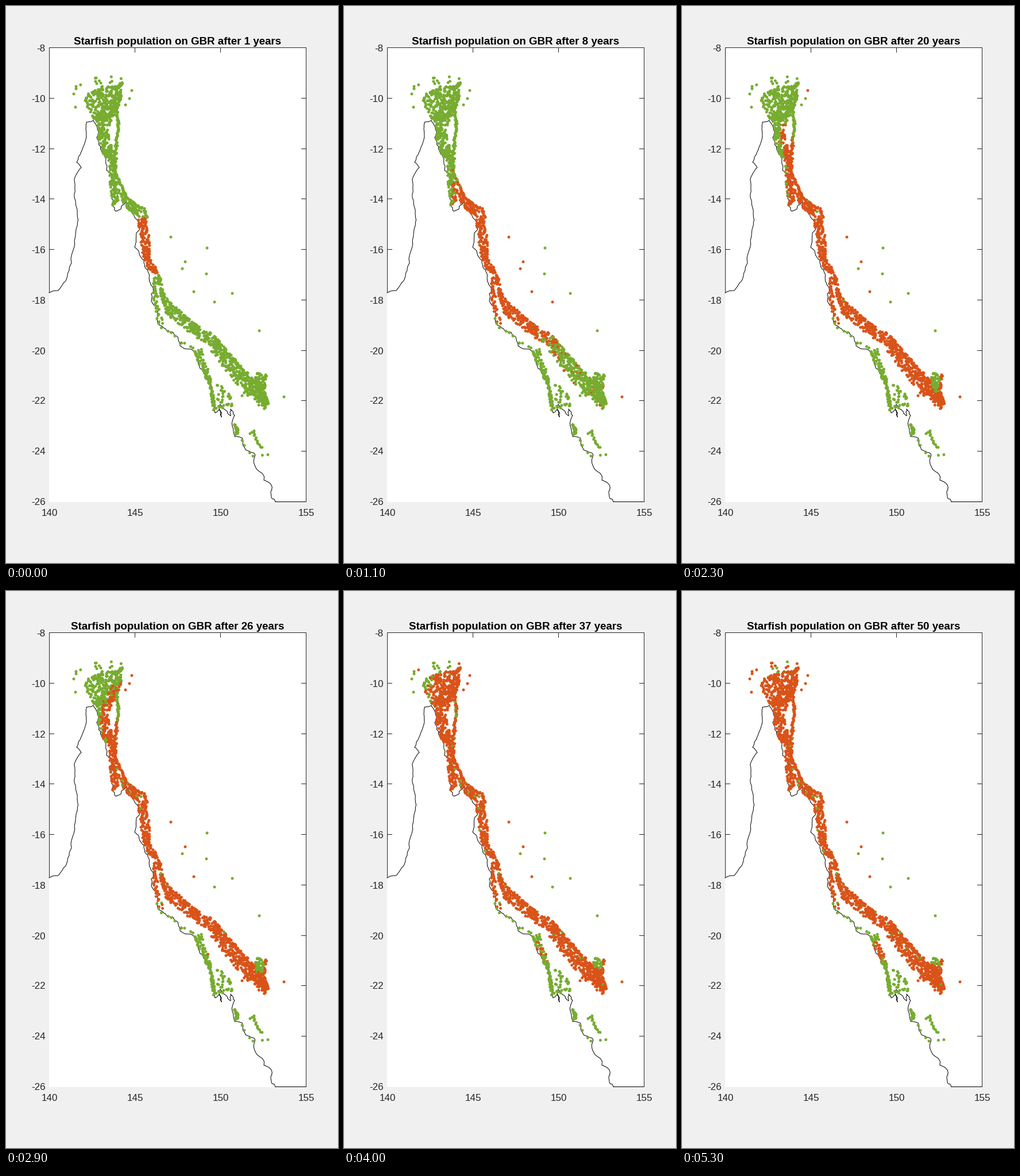
Animation, 578 px wide and 969 px high, one loop 5.4 s. Source, as a matplotlib script:

```python
import numpy as np
import matplotlib.pyplot as plt
from matplotlib.animation import FuncAnimation
from matplotlib.colors import to_rgba
from matplotlib.patches import Polygon, Rectangle

W, H, DPI = 578, 969, 64
PX = 72 / DPI
LEFT, RIGHT, TOP, BOTTOM = 75.5, 522.5, 72.5, 862.5
INK = "#262626"
GREEN, ORANGE = to_rgba("#77AC30"), to_rgba("#D95319")
FRAMES, STEP = 54, 100
NEVER = 999

rng = np.random.default_rng(12)
reefs = []


# --- outbreak rules: year a reef turns orange; s runs from shore 0 to sea 1 ---

def start(x, y, s):
    return np.ones(len(x))


def never(x, y, s):
    return np.full(len(x), NEVER)


def north(x, y, s, lag=0):
    front = np.interp(y, [130, 165, 250, 300, 368], [31, 26, 15, 8.5, 2])
    delay = lag * (1 - s) ** 2 * rng.uniform(0.5, 1.6, len(x))
    return np.maximum(front + delay + rng.normal(0, 1.2, len(x)), 2)


def shelf(x, y, s):
    return north(x, y, s, lag=15)


def ribbon(x, y, s):
    hold = 25 * np.exp(-((y - 207) / 22) ** 2)
    return north(x, y, s) + hold * rng.uniform(0.2, 1.2, len(x))


def south(x, y, s):
    front = np.interp(x, [256, 300, 370, 457], [2, 4, 9.5, 14.5])
    early = np.where(rng.random(len(x)) < 0.07, 0.5, 1)
    return np.maximum(front * early + rng.normal(0, 1.4, len(x)), 2)


def block(x, y, s):
    hold = 45 * np.exp(-((y - 640) / 22) ** 2)
    return south(x, y, s) + hold * ((s > 0.08) & (s < 0.85))


def inshore(x, y, s):
    hit = (y > 610) & (y < 645)
    return np.where(hit, rng.uniform(24, 58, len(x)), NEVER)


def straggler(x, y, s):
    return rng.uniform(31, 60, len(x))


# --- reef layout ---

def along(pts, t):
    """Points at fractions t of a polyline's length."""
    pts = np.array(pts, float)
    run = np.r_[0, np.cumsum(np.hypot(*np.diff(pts, axis=0).T))]
    return np.column_stack([np.interp(t * run[-1], run, c) for c in pts.T])


def place(xy, on, off=NEVER):
    reefs.append(np.column_stack([xy, np.broadcast_to(on, len(xy)),
                                  np.broadcast_to(off, len(xy))]))


def settle(xy, rule, s):
    on = rule(xy[:, 0], xy[:, 1], s)
    heals = (rng.random(len(xy)) < 0.045) & (on < 14)
    place(xy, on, np.where(heals, rng.uniform(16, 32, len(xy)), NEVER))


def band(n, rule, shore, sea, lean=1.0):
    """Scatter n reefs between two lines; lean < 1 crowds them seaward."""
    t = rng.random(n)
    s = rng.random(n) ** lean
    a, b = along(shore, t), along(sea, t)
    settle(a + (b - a) * s[:, None], rule, s)


def chain(n, rule, spread, *pts):
    """String n reefs along a line."""
    xy = along(pts, np.linspace(0, 1, n)) + rng.normal(0, spread, (n, 2))
    settle(xy, rule, np.ones(n))


def spots(on, off, *pts):
    place(np.array(pts, float), on, off)


# northern shelf
settle(rng.normal((168, 136), (20, 8), (18, 2)), straggler, np.ones(18))
band(300, shelf, [(137, 152), (136, 180), (158, 202)],
     [(203, 133), (199, 158), (189, 190)], 0.75)
band(250, shelf, [(158, 200), (161, 240), (178, 275), (185, 347)],
     [(187, 188), (178, 215), (188, 262), (196, 340)])
band(80, north, [(192, 318), (206, 346), (228, 369)],
     [(202, 322), (218, 340), (244, 367)])
chain(150, ribbon, 1, (202, 155), (193, 178), (196, 212), (190, 258),
      (191, 293), (212, 336), (240, 354), (245, 366))

# first outbreak
band(165, start, [(229, 369), (233, 405), (240, 443), (252, 465)],
     [(244, 369), (250, 405), (250, 438), (267, 464)], 0.8)

# central reefs
band(65, south, [(260, 468), (268, 500), (279, 536)],
     [(268, 468), (276, 500), (287, 517)])
band(42, south, [(256, 472), (257, 518), (266, 555)],
     [(262, 472), (265, 520), (274, 552)])
band(165, south, [(279, 538), (308, 560), (347, 588)],
     [(287, 516), (325, 549), (363, 573)], 0.8)

# southern reefs
band(400, south, [(349, 588), (380, 634), (412, 671), (449, 703)],
     [(363, 573), (398, 614), (430, 648), (457, 692)], 0.65)
band(160, block, [(433, 638), (434, 660), (447, 692)],
     [(454, 641), (451, 668), (457, 692)])

# southern inshore reefs
chain(11, never, 3, (265, 547), (282, 563), (308, 588), (326, 594))
band(125, inshore, [(327, 600), (338, 628), (354, 660), (361, 704)],
     [(340, 597), (348, 618), (356, 648), (365, 700)])
band(34, never, [(367, 658), (366, 702)], [(384, 658), (397, 700)])
band(24, never, [(397, 727), (398, 748)], [(404, 733), (407, 743)])
chain(14, never, 1, (426, 744), (431, 739), (433, 750), (446, 770))
chain(6, never, 2, (411, 756), (423, 774), (432, 785), (454, 779))

# isolated reefs
spots(NEVER, NEVER, (350, 421), (349, 466), (394, 500), (441, 565))
spots(5, NEVER, (287, 402), (312, 445), (327, 497), (484, 680))
spots(6, 11, (307, 457))
spots(6, 20, (363, 515))
spots(11, NEVER, (219, 147), (411, 678))
spots(24, NEVER, (215, 161), (208, 172))
spots(38, NEVER, (118, 153), (122, 140), (122, 144), (121, 176))

reefs = np.vstack(reefs)

# --- coast: key points, roughened by midpoint displacement ---

west = [(75, 499), (92, 494), (104, 478), (110, 460), (114, 434), (124, 382),
        (124, 362), (119, 333), (123, 292), (131, 281), (123, 272), (133, 249),
        (139, 214), (140, 202), (152, 199)]
east = [(152, 199), (160, 225), (168, 256), (175, 286), (182, 292), (184, 335),
        (191, 357), (200, 353), (209, 342), (222, 362), (232, 380), (237, 440),
        (249, 466), (256, 490), (257, 520), (264, 534), (265, 553), (285, 567),
        (298, 575), (303, 591), (335, 612), (344, 639), (358, 676), (364, 708),
        (372, 702), (375, 715), (373, 693), (391, 713), (391, 701), (398, 712),
        (398, 749), (417, 772), (433, 784), (449, 825), (460, 831), (461, 846),
        (469, 862.5)]


def rough(pts, amount, rounds=3):
    pts = np.array(pts, float)
    for _ in range(rounds):
        step = np.diff(pts, axis=0)
        normal = np.column_stack([-step[:, 1], step[:, 0]])
        mid = pts[:-1] + step / 2 + normal * rng.normal(0, amount, (len(step), 1))
        pts = np.insert(pts, np.arange(1, len(pts)), mid, axis=0)
    return pts


coast = np.vstack([rough(west, 0.06), rough(east, 0.11)])

# --- stage ---

plt.rcParams["font.family"] = "Liberation Sans"
fig = plt.figure(figsize=(W / DPI, H / DPI), dpi=DPI, facecolor="#f0f0f0")
ax = fig.add_axes([0, 0, 1, 1])
ax.set_xlim(0, W)
ax.set_ylim(H, 0)
ax.axis("off")


def line(x, y, color=INK, z=2):
    ax.plot(x, y, color=color, lw=PX, zorder=z, snap=False,
            solid_capstyle="projecting")


def label(x, y, text, size, **kw):
    return ax.text(x, y, text, fontsize=size * PX, va="baseline", **kw)


ax.add_patch(Rectangle((75, 72), 448, 791, fc="white", ec="none", snap=False))
line([LEFT, RIGHT, RIGHT, LEFT, LEFT], [TOP, TOP, BOTTOM, BOTTOM, TOP])

for lon in range(140, 156, 5):
    x = round(LEFT + (lon - 140) / 15 * (RIGHT - LEFT) - 0.5) + 0.5
    line([x, x], [TOP, TOP + 8])
    line([x, x], [BOTTOM, BOTTOM - 8])
    label(x, 887, str(lon), 17, ha="center", color=INK)
for lat in range(-8, -27, -2):
    y = round(TOP + (-8 - lat) / 18 * (BOTTOM - TOP) - 0.5) + 0.5
    line([LEFT, LEFT + 8], [y, y])
    line([RIGHT, RIGHT - 8], [y, y])
    label(68.5, y + 6, str(lat), 17, ha="right", color=INK)

# The white land hides the frame along the lower left
land = np.vstack([coast, [(469, 863), (75, 863)]])
ax.add_patch(Polygon(land, fc="white", ec="none", snap=False, zorder=3))
line(coast[:, 0], coast[:, 1], "black", 4)
line([469, RIGHT], [BOTTOM, BOTTOM], "black", 4)

dots = ax.scatter(reefs[:, 0], reefs[:, 1], s=(5 * PX) ** 2, lw=0, zorder=5)
title = label(299, 66.5, "", 18.7, ha="center", weight="bold", color="black")


def draw(i):
    year = max(1, i - 3)
    sick = (reefs[:, 2] <= year) & (year < reefs[:, 3])
    dots.set_facecolor(np.where(sick[:, None], ORANGE, GREEN))
    title.set_text(f"Starfish population on GBR after {year} years")
    return dots, title


def reset():
    return draw(0)


anim = FuncAnimation(fig, draw, frames=FRAMES, init_func=reset,
                     interval=STEP, repeat=True)
plt.show()
```
